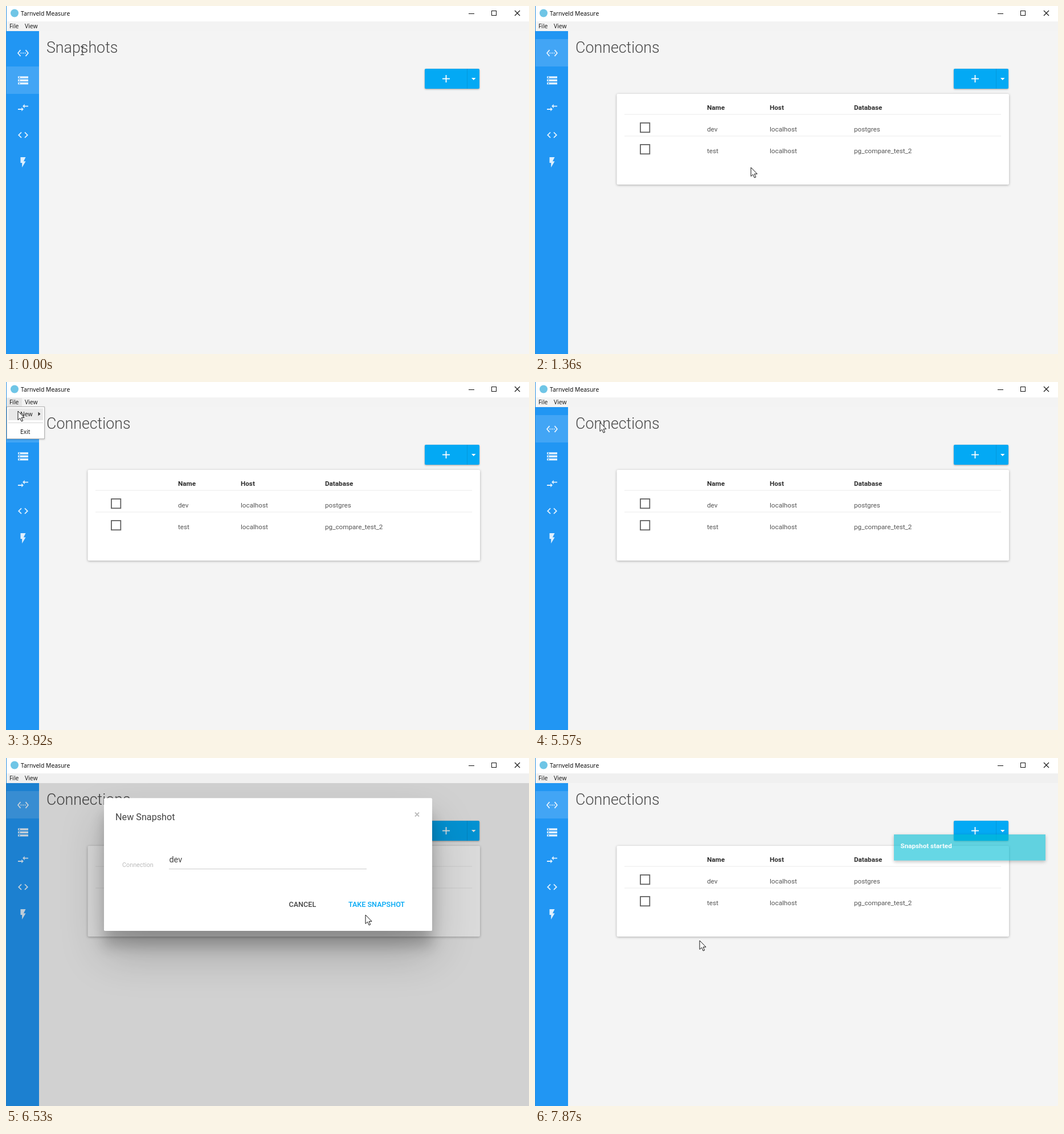
These frames come from a looping animation (918x610 px, 7990 ms). An HTML page with a canvas:

```html
<!DOCTYPE html>
<html lang="en">
<head>
<meta charset="utf-8">
<title>Snapshots</title>
<style>
html, body { margin: 0; width: 100%; height: 100%; overflow: hidden; background: #f4f4f4; }
canvas { display: block; }
</style>
</head>
<body>
<canvas id="stage" width="918" height="610"></canvas>
<script>
const c = document.getElementById('stage').getContext('2d');
const LOOP = 7990;
const ROBOTO = 'Roboto, sans-serif';
const SYSTEM = '"Open Sans", sans-serif';
const BLUE = '#2196f3', ACCENT = '#03a9f4';

// Screen updates come in bursts: first, last, count
const bursts = [
  [150, 1080, 8], [1210, 2020, 7], [2300, 3280, 8], [3540, 3920, 3],
  [4320, 5020, 6], [5300, 6230, 8], [6380, 6690, 3], [6960, 7870, 8]
];
// Pointer path: time, x, y
const path = [
  [0, 134, 78], [150, 128, 79], [410, 50, 86], [545, 34, 90], [815, 32, 90],
  [1080, 190, 215], [1345, 379, 283], [1615, 370, 275], [2020, 70, 172],
  [2300, 52, 168], [2580, 63, 133], [2720, 45, 100], [2860, 30, 70],
  [3000, 20, 48], [3280, 13, 36], [3540, 13, 36], [3920, 21, 51],
  [4320, 24, 51], [4600, 75, 56], [5020, 114, 71], [5566, 114, 71],
  [5966, 300, 230], [6230, 471, 348], [6535, 631, 275], [6690, 650, 258],
  [6960, 650, 258], [7870, 289, 320]
];
// Sidebar hovers: start, end, item
const hovers = [[410, 950, 0], [2300, 2500, 2], [2500, 2650, 1], [2650, 2950, 0]];
const labels = ['Connections', 'Snapshots', 'Comparisons'];

const arrows = new Path2D('M9 14H2v2h7v3l4-4-4-4zM15 13v-3h7V8h-7V5l-4 4z');
const bolt = new Path2D('M7 2v11h3v9l7-12h-4l4-8z');
const arrowPointer = new Path2D('M0 0V15.5L3.6 12.2 6.2 18 8.6 17 6.2 11.3H11Z');
const handPointer = new Path2D('M4.5 12V2.2q1.2-1.8 2.6 0V8q1.3-1 2.4.3 1.4-.9 2.3.5 1.6-.7 2.2.8V15l-2 3.5V21H6v-2L1 12.5q0-2 2-1.2z');

const clamp = v => Math.max(0, Math.min(1, v));
const within = (t, a, b) => t >= a && t < b;

function rect(x, y, w, h, fill) {
  c.fillStyle = fill;
  c.fillRect(x, y, w, h);
}

function text(str, x, y, size, color, weight = 400, family = ROBOTO) {
  c.font = `${weight} ${size}px ${family}`;
  c.fillStyle = color;
  c.fillText(str, x, y);
}

function line(points, color, width) {
  c.beginPath();
  points.forEach(([x, y]) => c.lineTo(x, y));
  c.strokeStyle = color;
  c.lineWidth = width;
  c.stroke();
}

function panel(x, y, w, h, fill, dy, blur, alpha, radius = 2) {
  c.save();
  c.shadowColor = `rgba(0,0,0,${alpha})`;
  c.shadowOffsetY = dy;
  c.shadowBlur = blur;
  c.fillStyle = fill;
  c.beginPath();
  c.roundRect(x, y, w, h, radius);
  c.fill();
  c.restore();
}

function snap(t) {
  for (const [a, b, n] of [...bursts].reverse()) {
    if (t < a) continue;
    const d = (b - a) / (n - 1);
    return a + Math.min(n - 1, Math.floor((t - a + 20) / d)) * d;
  }
  return 0;
}

function pointerAt(t) {
  const i = path.findIndex(k => k[0] > t);
  if (i < 0) return path[path.length - 1].slice(1);
  const [t0, x0, y0] = path[i - 1], [t1, x1, y1] = path[i];
  const p = (t - t0) / (t1 - t0);
  return [x0 + (x1 - x0) * p, y0 + (y1 - y0) * p];
}

function windowFrame() {
  rect(0, 0, 918, 27, '#fff');
  c.fillStyle = '#6fc5e6';
  c.beginPath();
  c.arc(15, 12.5, 7, 0, 7);
  c.fill();
  text('Tarnveld Measure', 26, 17, 10.4, '#000', 400, SYSTEM);
  line([[812, 13.5], [822, 13.5]], '#111', 1);
  c.strokeRect(852.5, 8.5, 8, 8);
  line([[893, 8], [902, 17]], '#111', 1.1);
  line([[902, 8], [893, 17]], '#111', 1.1);
}

function menuBar(t) {
  rect(0, 27, 918, 17, t < 5700 ? '#f3f3f3' : '#f0f0f0');
  if (within(t, 3540, 5300)) rect(1, 28, 27, 15, '#e5e5e5');
  text('File', 6, 39, 10.4, '#111', 400, SYSTEM);
  text('View', 33, 39, 10.4, '#111', 400, SYSTEM);
}

function icon(i, color) {
  c.save();
  c.translate(30 - 10.8, 82.5 + i * 47.9 - 10.8);
  c.scale(0.9, 0.9);
  c.fillStyle = color;
  if (i === 0) {
    line([[7, 6.1], [2.1, 12], [7, 17.9]], color, 2);
    line([[17, 6.1], [21.9, 12], [17, 17.9]], color, 2);
    for (const x of [7, 11, 15]) c.fillRect(x, 11, 2, 2);
  } else if (i === 1) {
    c.beginPath();
    for (const y of [4, 10, 16]) {
      c.rect(2, y, 20, 4);
      c.rect(4, y + 1, 2, 2);
    }
    c.fill('evenodd');
  } else if (i === 3) {
    line([[8.7, 6.7], [3.4, 12], [8.7, 17.3]], color, 2);
    line([[15.3, 6.7], [20.6, 12], [15.3, 17.3]], color, 2);
  } else {
    c.fill(i === 2 ? arrows : bolt);
  }
  c.restore();
}

function sidebar(t, connected) {
  rect(0, 44, 58, 566, BLUE);
  const active = connected ? 0 : 1;
  rect(1, 58 + active * 48, 57, 48, '#42a5f5');
  let hot = -1;
  for (const [a, b, i] of hovers) {
    if (t < a) continue;
    const on = t < b;
    const glow = clamp((Math.min(t, b) - a) / 300) * clamp(1 - (t - b) / 200);
    const tint = `rgba(255,255,255,${0.15 * glow})`;
    const y = 58 + i * 48, w = on ? 220 : 57;
    if (on) {
      hot = i;
      rect(1, y, w, 48, BLUE);
      text(labels[i], 72, y + 77 - 48, 11.7, '#fff', 700);
    }
    if (glow > 0 && (on || i !== active)) rect(1, y, w, 48, tint);
  }
  for (let i = 0; i < 5; i++) icon(i, i === hot ? '#fff' : 'rgba(255,255,255,.86)');
}

function addButton() {
  panel(735, 110, 96, 35, ACCENT, 1, 3, 0.35);
  rect(809, 110, 1, 35, '#0398dc');
  line([[766, 127.5], [779, 127.5]], '#fff', 1.8);
  line([[772.5, 121], [772.5, 134]], '#fff', 1.8);
  c.fillStyle = '#fff';
  c.beginPath();
  c.moveTo(817, 126);
  c.lineTo(824.5, 126);
  c.lineTo(820.75, 130);
  c.fill();
}

function row(y, cells, weight, color) {
  [302, 412, 560].forEach((x, i) => text(cells[i], x, y, 11.7, color, weight));
}

function table() {
  panel(143.5, 154, 688.5, 159, '#fff', 1, 4, 0.3);
  row(182, ['Name', 'Host', 'Database'], 700, '#2b2b2b');
  row(220, ['dev', 'localhost', 'postgres'], 400, '#555');
  row(258, ['test', 'localhost', 'pg_compare_test_2'], 400, '#555');
  for (const y of [190, 228]) {
    rect(157, y - 0.5, 661, 1, '#ececec');
    c.strokeStyle = '#616161';
    c.lineWidth = 1.8;
    c.strokeRect(185, y + 15, 16.3, 16.3);
  }
}

function menuBox(x, y, w, h) {
  panel(x, y, w, h, '#fff', 1, 3, 0.2, 0);
  c.strokeStyle = '#b4b4b4';
  c.lineWidth = 1;
  c.strokeRect(x + 0.5, y + 0.5, w - 1, h - 1);
}

function menus(t, y) {
  if (!within(t, 3540, 5300)) return;
  menuBox(1, 43, 67, 57);
  if (t > 3800) rect(4, 46, 61, 21, '#e9e9e9');
  text('New', 25, 60, 10.4, '#111', 400, SYSTEM);
  text('Exit', 25, 91, 10.4, '#111', 400, SYSTEM);
  rect(4, 71, 61, 1, '#d5d5d5');
  c.fillStyle = '#333';
  c.beginPath();
  c.moveTo(56.5, 52.5);
  c.lineTo(60.5, 56);
  c.lineTo(56.5, 59.5);
  c.fill();
  if (t < 4320) return;
  menuBox(67, 43, 169, 110);
  if (t > 4550) rect(70, y < 67 ? 46 : 67, 163, 21, '#e9e9e9');
  ['Connection', 'Snapshot', 'Comparison', 'Script', 'Deployment'].forEach((s, i) =>
    text(s, 92, 60 + i * 21, 10.4, '#111', 400, SYSTEM));
}

function dialog(t) {
  const open = clamp((t - 5690) / 400), close = clamp((t - 6960) / 300);
  const p = (1 - (1 - open) ** 2) * (1 - close);
  if (!p) return;
  c.save();
  c.beginPath();
  c.rect(0, 44, 918, 566);
  c.clip();
  rect(0, 44, 918, 566, `rgba(0,0,0,${0.145 * p})`);
  c.globalAlpha = p;
  c.translate(0, -40 * (1 - p));
  panel(172, 70.5, 576, 232.5, '#fff', 40, 77, 0.22);
  panel(172, 70.5, 576, 232.5, '#fff', 27, 24, 0.2);
  text('New Snapshot', 192, 109, 16.2, '#444');
  line([[718, 95.5], [725, 102.5]], '#bdbdbd', 2);
  line([[725, 95.5], [718, 102.5]], '#bdbdbd', 2);
  text('Connection', 204, 191, 10.8, '#bbb');
  text('dev', 286.5, 183, 14.4, '#444');
  rect(286, 194, 347, 1, '#ccc');
  if (t > 6650) rect(575, 242, 150, 30, '#f0f0f0');
  text('CANCEL', 496.5, 261, 12.6, '#444', 500);
  text('TAKE SNAPSHOT', 601, 261, 12.6, ACCENT, 500);
  c.restore();
}

function toast(t) {
  const a = 0.6 * clamp((t - 7610) / 260);
  if (!a) return;
  c.save();
  c.globalAlpha = a;
  // Shadow stays outside so the translucent fill keeps its tint
  c.save();
  c.beginPath();
  c.rect(610, 114, 306, 90);
  c.rect(630, 134, 266, 45.5);
  c.clip('evenodd');
  panel(630, 134, 266, 45.5, '#00bcd4', 2, 6, 0.4, 0);
  c.restore();
  rect(630, 134, 266, 45.5, '#00bcd4');
  c.globalAlpha = Math.min(1, a * 1.6);
  text('Snapshot started', 641.5, 158, 11.7, '#fff', 700);
  c.restore();
}

function pointer(t, x, y) {
  if (t < 280) {
    line([[x - 3, y - 6.5], [x + 3, y - 6.5]], '#222', 1);
    line([[x, y - 6.5], [x, y + 7.5]], '#222', 1);
    line([[x - 3, y + 7.5], [x + 3, y + 7.5]], '#222', 1);
    return;
  }
  const hand = hovers.some(([a, b]) => within(t, a, b)) || within(t, 6650, 7000);
  const shape = hand ? handPointer : arrowPointer;
  c.save();
  c.translate(hand ? x - 5 : x, y);
  c.fillStyle = '#fff';
  c.strokeStyle = '#111';
  c.lineWidth = 1;
  c.lineJoin = 'round';
  c.fill(shape);
  c.stroke(shape);
  c.restore();
}

function draw(t) {
  const [x, y] = pointerAt(t);
  const connected = t > 670;
  rect(0, 0, 918, 610, '#f4f4f4');
  windowFrame();
  menuBar(t);
  text(connected ? 'Connections' : 'Snapshots', 71, 81.5, 26.8, '#4a4a4a', 300);
  addButton();
  if (connected) table();
  sidebar(t, connected);
  rect(0, 0, 1, 610, '#2a8fe0');
  dialog(t);
  menus(t, y);
  toast(t);
  pointer(t, x, y);
}

let start;
function tick(now) {
  start ??= now;
  draw(snap((now - start) % LOOP));
  requestAnimationFrame(tick);
}
draw(0);
requestAnimationFrame(tick);
</script>
</body>
</html>
```
